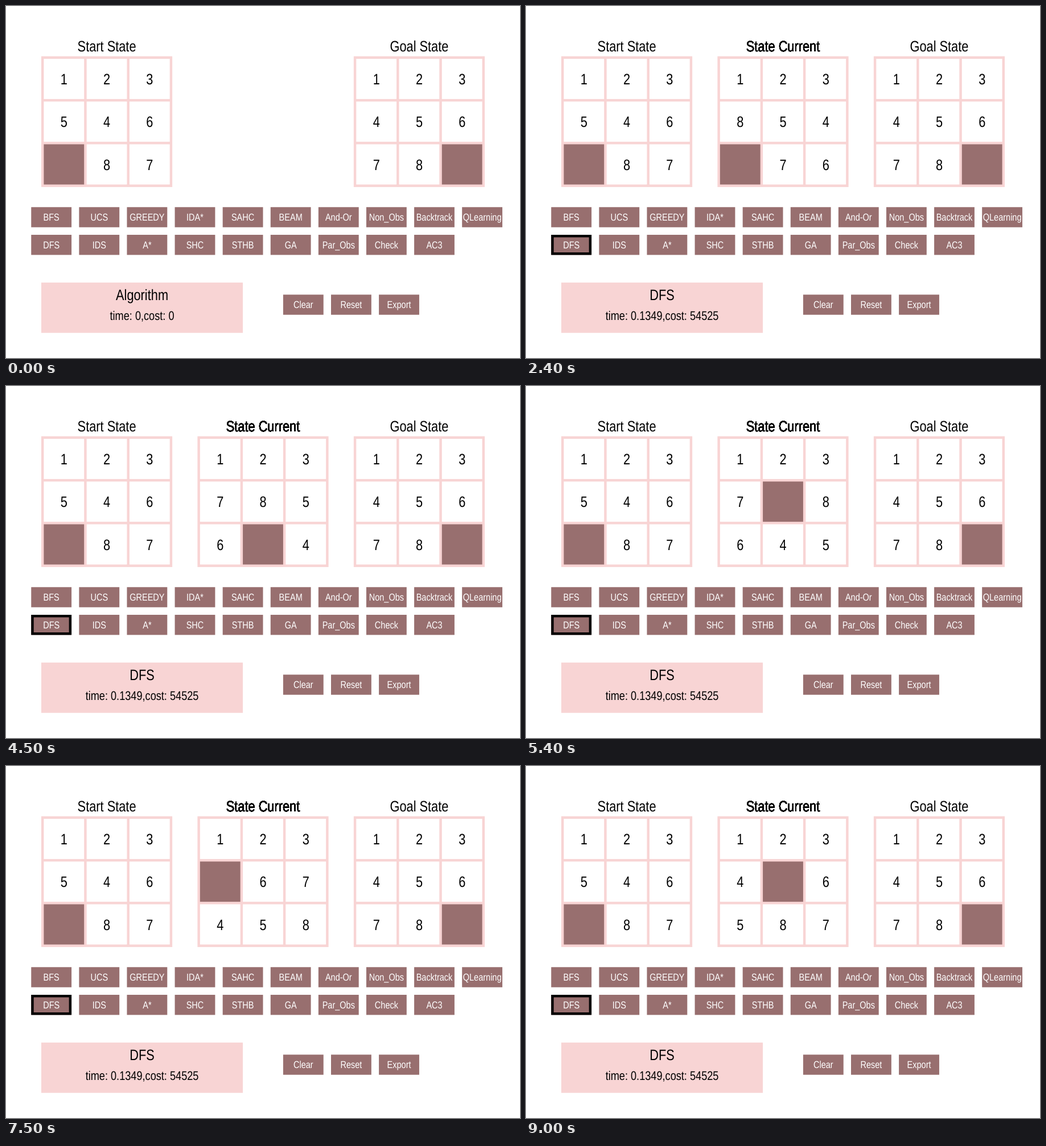
An HTML page for the animation above (9.3 s loop, 903 by 620 pixels).

```html
<!DOCTYPE html>
<html lang="en">
<head>
<meta charset="utf-8">
<title>Eight puzzle</title>
<style>
  html, body { margin: 0; width: 100%; height: 100%; overflow: hidden; background: #fff; }
  svg { display: block; width: 100vw; height: 100vh; }
  text {
    font-family: "Liberation Sans", Arial, sans-serif;
    text-anchor: middle;
    text-rendering: geometricPrecision;
  }
</style>
</head>
<body>
<svg id="stage" viewBox="0 0 1020 700" preserveAspectRatio="none"></svg>
<script>
const PINK = '#f8d4d4', BROWN = '#986f6f';
const LOOP = 9300, STEP = 300, RUN_AT = 600;
const NARROW = 0.82; // condensed face
const START = '123546_87';
const MOVES = [1, 1, -3, -1, -1, 3]; // the blank circles the two lower rows
const stage = document.getElementById('stage');

function add(parent, tag, attrs) {
  const el = document.createElementNS('http://www.w3.org/2000/svg', tag);
  for (const key in attrs) el.setAttribute(key, attrs[key]);
  return parent.appendChild(el);
}

function rect(parent, x, y, width, height, fill) {
  return add(parent, 'rect', { x, y, width, height, fill });
}

// (x, y) is the middle of the capitals
function label(parent, x, y, size, str, fill = '#000') {
  const el = add(parent, 'text', {
    transform: `translate(${x} ${y + size * 0.36}) scale(${NARROW} 1)`,
    'font-size': size, fill
  });
  el.textContent = str;
  return el;
}

function button(x, y, str) {
  rect(stage, x, y, 80, 40, BROWN);
  label(stage, x + 40, y + 20, 20, str, '#fff');
}

function board(parent, x) {
  rect(parent, x, 100, 260, 260, PINK);
  const cells = Array.from({ length: 9 }, (_, i) => {
    const cx = x + 5 + (i % 3) * 85, cy = 105 + Math.floor(i / 3) * 85;
    return {
      tile: rect(parent, cx, cy, 80, 80, '#fff'),
      digit: label(parent, cx + 40, cy + 40, 30, '')
    };
  });
  return state => cells.forEach(({ tile, digit }, i) => {
    const blank = state[i] === '_';
    tile.setAttribute('fill', blank ? BROWN : '#fff');
    digit.textContent = blank ? '' : state[i];
  });
}

function show(el, on) {
  el.setAttribute('visibility', on ? 'inherit' : 'hidden');
}

// Board after each step of the search
const states = [START];
for (let n = 0; n < (LOOP - RUN_AT) / STEP - 1; n++) {
  const next = [...states[n]];
  const from = next.indexOf('_'), to = from + MOVES[n % MOVES.length];
  [next[from], next[to]] = [next[to], next[from]];
  states.push(next.join(''));
}

label(stage, 200, 79, 30, 'Start State');
board(stage, 70)(START);
label(stage, 820, 79, 30, 'Goal State');
board(stage, 690)('12345678_');

['BFS UCS GREEDY IDA* SAHC BEAM And-Or Non_Obs Backtrack QLearning',
 'DFS IDS A* SHC STHB GA Par_Obs Check AC3'].forEach((row, r) =>
  row.split(' ').forEach((name, i) => button(50 + 95 * i, 400 + 55 * r, name)));
['Clear', 'Reset', 'Export'].forEach((name, i) => button(550 + 95 * i, 574, name));

rect(stage, 70, 550, 400, 100, PINK);
const algorithm = label(stage, 270, 574, 30, '');
const result = label(stage, 270, 615, 25, '');

const run = add(stage, 'g', {});
add(run, 'rect', {
  x: 52.5, y: 457.5, width: 75, height: 35,
  fill: 'none', stroke: '#000', 'stroke-width': 5
});
const drawCurrent = board(run, 380);
// The title is painted again on every step, so its edges darken
const titles = Array.from({ length: 12 }, () => label(run, 510, 79, 30, 'State Current'));

let shown = null;
function render(time) {
  const step = Math.floor((time % LOOP - RUN_AT) / STEP);
  if (step === shown) return;
  shown = step;
  const running = step >= 0;
  show(run, running);
  algorithm.textContent = running ? 'DFS' : 'Algorithm';
  result.textContent = running ? 'time: 0.1349,cost: 54525' : 'time: 0,cost: 0';
  titles.forEach((el, i) => show(el, i <= step));
  if (running) drawCurrent(states[step]);
}

const began = performance.now();
function tick() {
  render(performance.now() - began);
  requestAnimationFrame(tick);
}
tick();
</script>
</body>
</html>
```
